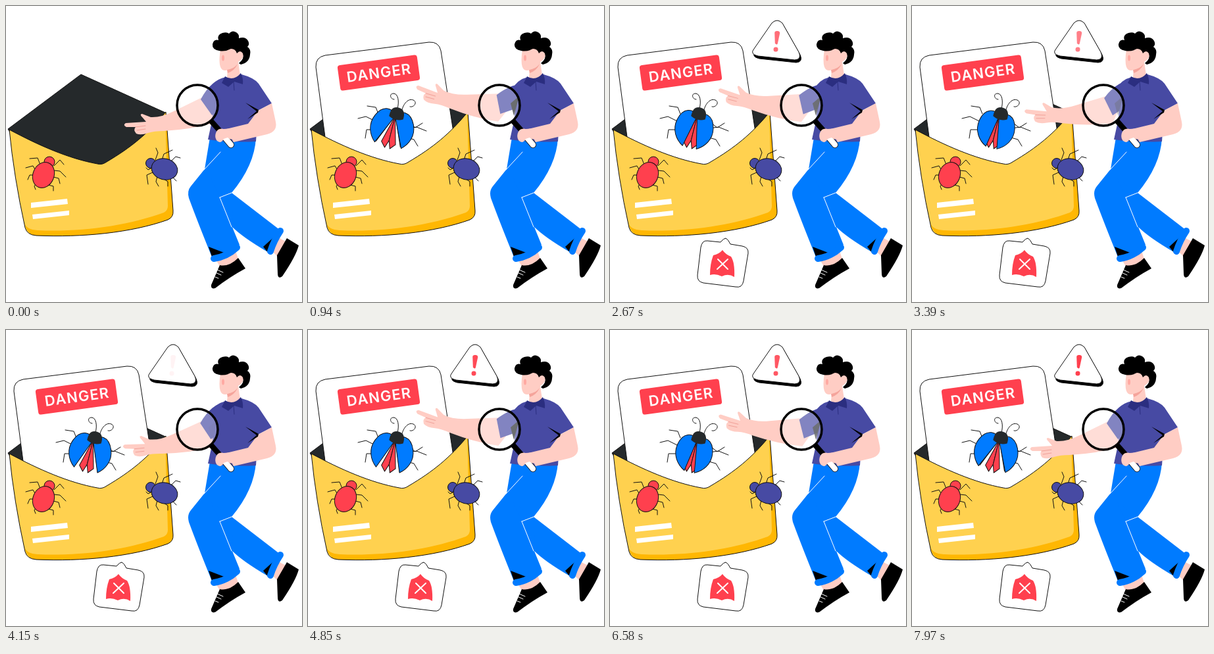
Write an HTML page that moves like this. It is 450x450 px and loops after 8 s.

```html
<!DOCTYPE html>
<html lang="en">
<head>
<meta charset="utf-8">
<title>Danger in the mail</title>
<style>
  html, body { margin: 0; height: 100%; overflow: hidden; background: #fff; }
  svg { display: block; width: 100vw; height: 100vh; }
  .line { fill: none; stroke: #111; stroke-width: 1; stroke-linejoin: round; stroke-linecap: round; }
  .edge { stroke: #111; stroke-width: 1; stroke-linejoin: round; }
  .skin { fill: #ffcdc4; }
  .blue { fill: #007bff; }
  .cuff { stroke: #007bff; stroke-width: 10; stroke-linecap: round; }
  .shirt { fill: #474aa3; }
  .red { fill: #ff404e; }
  .white { fill: #fff; }
  .dark { fill: #25292b; }
  text { font: 600 22px Inter, Roboto, sans-serif; letter-spacing: 1.2px; fill: #fff; text-anchor: middle; }
</style>
</head>
<body>
<svg viewBox="0 0 450 450">
  <clipPath id="mouth"><path d="M3 0V187L30 335L252 318L245 162V0Z"/></clipPath>

  <!-- envelope -->
  <path class="dark edge" d="M3 187L114 104L242 162L235 215L143 255L20 215Z"/>
  <g clip-path="url(#mouth)">
    <g id="letter">
      <path class="white edge" d="M34 260L12 93Q11 78 26 75L184 55Q199 54 202 68L230 250Z"/>
      <g transform="translate(107.500 101.500) rotate(-7.800)">
        <rect class="red" x="-61" y="-19.500" width="122" height="39" rx="4"/>
        <text x=".6" y="8">DANGER</text>
      </g>
      <path class="line" d="M107 164L103 154L90 152M102 175L88 168L76 171M103 188L89 188L87 201M149 174L163 185L174 178M150 186L165 184L180 190M147 199L161 203L167 213"/>
      <path class="line" d="M136 156C139 145 137 133 130 133S125 142 131 142M143 158C145 148 153 140 160 143S161 155 155 153"/>
      <g transform="translate(132.500 167.500) rotate(14)">
        <g class="left">
          <path class="inner red edge" d="M0 0L-11 42L-4 50L0 38Z"/>
          <path class="inner dark" d="M0 0L-15 35L-9 48Z"/>
          <path class="wing blue edge" d="M0 0C-10 -8 -25 -3 -25 18C-25 35 -13 46 0 50Z"/>
        </g>
        <g transform="scale(-1 1)">
          <path class="inner red edge" d="M0 0L-11 42L-4 50L0 38Z"/>
          <path class="inner dark" d="M0 0L-15 35L-9 48Z"/>
          <path class="wing blue edge" d="M0 0C-10 -8 -25 -3 -25 18C-25 35 -13 46 0 50Z"/>
        </g>
        <path class="dark" d="M-9 2Q-10 -14 2 -14T13 2Q2 8 -9 2Z"/>
      </g>
    </g>
  </g>
  <path fill="#ffd14f" d="M5 188C50 212 95 232 139 240Q146 242 153 237C190 215 215 195 243 161L254 311Q255 321 246 325C190 345 115 352 46 349Q32 348 29 337Q12 260 5 188Z"/>
  <path fill="#ffb703" d="M28 330Q31 340 48 341C115 344 185 334 240 314Q246 311 246 304L242 163H243L254 311Q255 321 246 325C190 345 115 352 46 349Q32 348 28 330Z"/>
  <path class="line" d="M5 188C50 212 95 232 139 240Q146 242 153 237C190 215 215 195 243 161L254 311Q255 321 246 325C190 345 115 352 46 349Q32 348 29 337Q12 260 5 188Z"/>
  <path class="white" d="M38 299L93 293L94 301L38 307ZM40 317L96 311V318L41 324Z"/>

  <!-- spiders -->
  <path class="line" d="M52 241L48 231L36 232M45 250L41 243L30 246M42 257L36 257L33 264M47 268L43 274L45 279M73 243L82 234L88 241M73 250L82 251L91 260M72 260L80 262L82 270M64 272L72 274L72 281"/>
  <circle class="red edge" cx="66" cy="237" r="8"/>
  <ellipse class="red edge" cx="57" cy="257" rx="16" ry="20" transform="rotate(22 57 257)"/>
  <path class="line" d="M227 234L231 223L228 216M237 234L240 225L253 219M251 236L258 229L265 231M224 245L216 249L213 246M225 252L214 257L216 271M230 259L228 267L232 274M240 263L246 267L246 274M253 260L259 266"/>
  <circle class="shirt edge" cx="220" cy="239" r="7.500"/>
  <ellipse class="shirt edge" cx="241" cy="248" rx="20" ry="16" transform="rotate(14 241 248)"/>

  <!-- legs and shoes -->
  <path class="skin" d="M400 368L414 352L429 360L414 382ZM318 384L349 372L354 388L327 399Z"/>
  <path d="M412 379L427 353L445 364Q441 380 420 411Q413 416 413 406ZM325 394Q339 397 353 383L364 399Q340 412 318 429Q311 431 312 424Z"/>
  <path class="line" style="stroke:#fff" d="M318 405L327 409M321 401L330 405M318 412L323 414"/>
  <path class="blue" d="M310 200H380Q378 242 343 284L421 344L398 374Q360 352 343 335L326 292L355 363L314 384Q292 330 278 292Q275 281 281 274L302 248Z"/>
  <path class="blue" d="M310 260L343 284L345 335L326 292Z"/>
  <path class="line" style="stroke:#fff" d="M326 222L301 249M325 291L343 336M325 291L343 284"/>
  <path d="M308 366L334 376L314 384ZM391 366L412 347L399 376Z"/>
  <path class="cuff" d="M316 384Q336 381 351 367M417 342Q407 357 402 373" fill="none"/>

  <!-- pointing arm -->
  <g id="arm">
    <path class="skin" d="M300 138L255 160Q235 170 220 169L207 164Q202 164 208 170L213 176L182 178Q177 181 183 184L197 184Q193 188 198 194Q205 197 216 193Q225 190 240 190Q280 188 315 178L322 150Z"/>
    <path class="line" style="stroke:#f0a29a" d="M197 184L212 182M199 189L212 187"/>
    <path class="shirt" d="M335 108Q312 112 296 142L313 166L330 150Z"/>
  </g>

  <!-- body and head -->
  <path class="shirt" d="M334 108Q345 115 358 104Q377 109 384 118L404 148L383 159L380 206Q340 208 307 203L312 180Q318 155 311 126Q318 112 334 108Z"/>
  <path id="shade" class="dark" d="M321 137L308 148L313 167Z"/>
  <path class="skin" d="M404 148L410 176Q413 191 397 195L346 207L335 187L368 179L383 159Z"/>
  <path d="M364 147L384 158L383 162L367 172L381 160Z"/>
  <path class="skin" d="M326 66Q322 92 329 97Q333 99 337 97L336 108Q345 117 356 105L353 85Q362 80 361 71L350 62Z"/>
  <path d="M336 97Q346 96 352 88Q348 98 337 102Z" fill="#f5a49b"/>
  <ellipse cx="330" cy="79" rx="2" ry="4.500" fill="#ffa9a2"/>
  <path d="M324 68Q313 66 314 58Q316 50 323 52Q320 44 329 41Q336 39 339 42Q344 36 350 40Q355 43 354 49Q364 46 368 53Q371 58 367 62Q373 66 371 74Q370 86 357 89L354 87Q363 80 360 72Q356 66 351 72Q349 65 342 65Q333 70 324 68Z"/>
  <path d="M333 107L328 117L338 123L347 115L360 119Q361 110 357 102Q346 115 333 107Z" fill="#2b2e80"/>
  <path class="line" style="stroke:#2b2e80" d="M346 114L347 128"/>

  <!-- magnifier -->
  <circle cx="291" cy="151" r="31" fill="#fff" fill-opacity=".32" stroke="#000" stroke-width="3.500"/>
  <path d="M311 174L327 192" stroke="#000" stroke-width="8"/>
  <path d="M326 192L342 211" stroke="#111" stroke-width="10" stroke-linecap="round"/>
  <path d="M326 192L342 211" stroke="#fff" stroke-width="8.500" stroke-linecap="round"/>
  <path class="skin" d="M319 193Q322 185 331 187L345 186L350 200Q342 205 337 200L331 202Q326 211 320 204Q317 199 319 193Z"/>

  <g id="alert">
    <path class="edge" transform="translate(2 4)" d="M219 65L246 26Q254 18 262 26L287 70Q292 81 281 82L225 76Q212 73 219 65Z"/>
    <path class="white edge" d="M219 65L246 26Q254 18 262 26L287 70Q292 81 281 82L225 76Q212 73 219 65Z"/>
    <g id="mark" class="red" transform="rotate(5 253 55)">
      <path d="M249 41Q249 38 253 38T257 41L255 57Q254 60 251 57Z"/>
      <circle cx="253" cy="66" r="3.500"/>
    </g>
  </g>

  <g id="bubble">
    <path class="white edge" d="M148 357L168 359Q173 353 176 353Q180 355 183 362L201 365Q211 367 210 376L203 418Q201 429 191 427L142 421Q132 419 133 409L138 367Q140 356 148 357Z"/>
    <path class="red" d="M171 371Q176 378 184 381Q190 390 189 412Q180 406 170 411Q160 406 152 409Q152 392 157 379Q166 377 171 371Z"/>
    <path d="M164 385L179 400M179 385L163 400" stroke="#fff" stroke-width="2" stroke-linecap="round"/>
  </g>
</svg>
<script>
const $ = id => document.getElementById(id);
const inner = document.querySelectorAll('.inner.dark'), wings = document.querySelectorAll('.wing');
const clamp = x => Math.min(1, Math.max(0, x));
const wave = x => .5 - .5 * Math.cos(Math.PI * x);
const set = (el, value) => el.setAttribute('transform', value);

// cubic-bezier(.4, 0, .17, 1)
function ease(x) {
  let lo = 0, hi = 1, u;
  for (let i = 0; i < 20; i++) {
    u = (lo + hi) / 2;
    const v = 1 - u;
    if (1.2 * v * v * u + .51 * v * u * u + u ** 3 < x) lo = u; else hi = u;
  }
  return u * u * (3 - 2 * u);
}

function backOut(x, s) {
  const q = clamp(x) - 1;
  return 1 + (s + 1) * q ** 3 + s * q * q;
}

function pop(id, t, start, x, y) {
  const el = $(id);
  el.style.display = t > start ? '' : 'none';
  set(el, `translate(${x} ${y}) scale(${backOut((t - start) / 650, 2.8)}) translate(${-x} ${-y})`);
}

function draw(now) {
  const t = now % 8000;
  set($('letter'), `translate(0 ${190 * (1 - backOut(t / 850, 2.2))})`);

  const swing = t % 2000 / 1000;
  const lift = swing < 1 ? ease(swing) : 1 - ease(swing - 1);
  set($('arm'), `rotate(${24.4 * lift} 307 117)`);
  $('shade').style.opacity = lift;

  const spread = 8 + 17 * (1 - wave(t / 500));
  wings.forEach(w => set(w, `rotate(${spread})`));
  inner.forEach(w => set(w, `rotate(${spread * .5})`));

  pop('alert', t, 1000, 253, 55);
  pop('bubble', t, 1600, 171, 390);
  $('mark').style.opacity = t < 6000 ? wave(t / 1000) : wave(clamp((t - 6000) / 750));
}

const begin = performance.now();
(function tick() {
  draw(performance.now() - begin);
  requestAnimationFrame(tick);
})();
</script>
</body>
</html>
```
